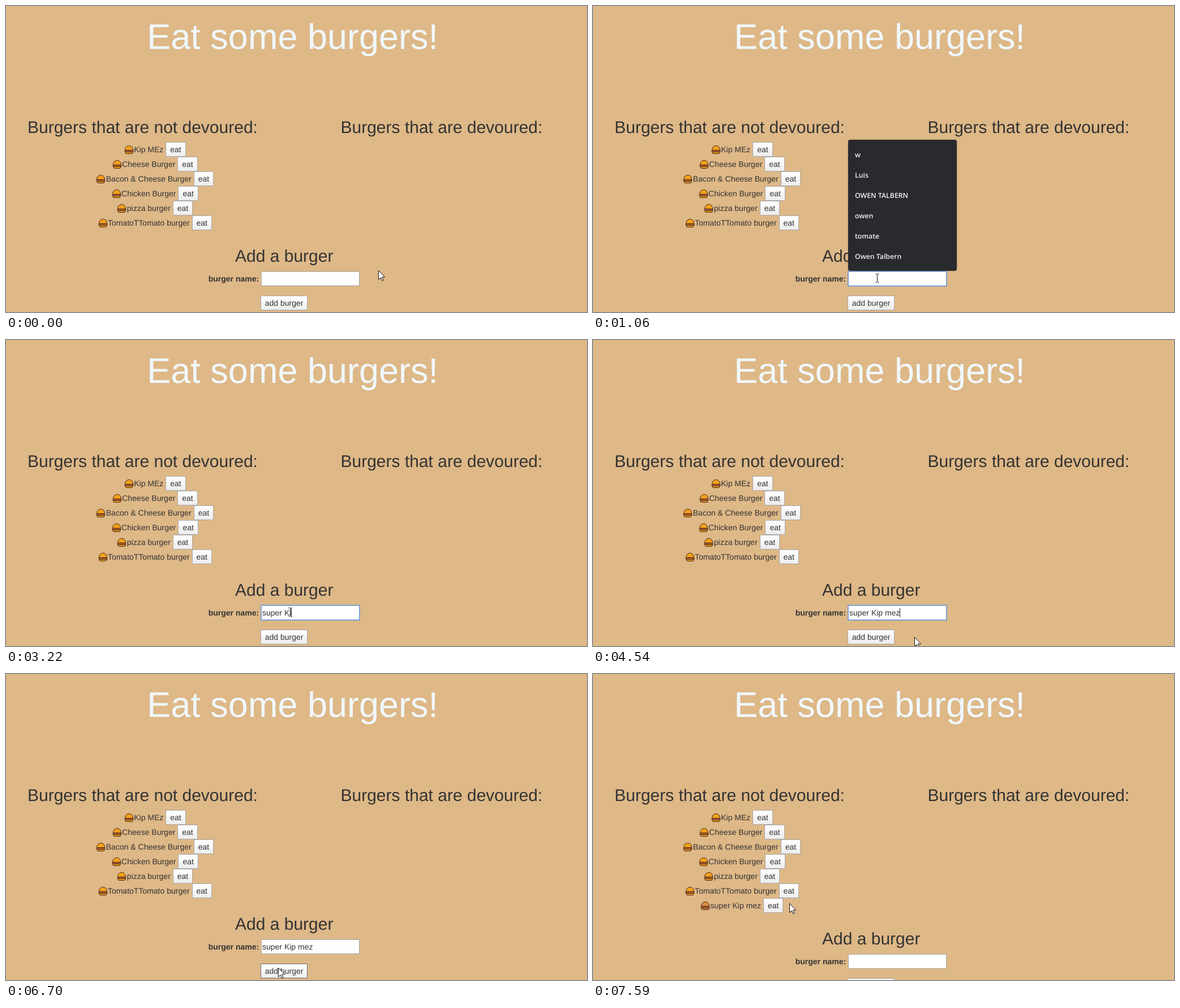
These frames come from a looping animation (1027x542 px, 8000 ms). An HTML page:

```html
<!DOCTYPE html>
<html lang="en">
<head>
<meta charset="utf-8">
<title>Eat some burgers!</title>
<style>
  html, body { margin: 0; width: 100%; height: 100%; overflow: hidden; background: #deb887; }
  body {
    position: relative; color: #333; white-space: pre; text-rendering: geometricPrecision;
    font: 14px/26px Arial, "Liberation Sans", sans-serif;
  }
  body * { box-sizing: border-box; }
  h1, h2, .abs, .row { position: absolute; margin: 0; font-weight: 400; }
  h1 { left: 249.3px; top: 20px; font-size: 63px; line-height: 70px; color: #f0f8ff; }
  h2 { font-size: 30px; line-height: 34px; }
  .row { left: 0; width: 526.5px; height: 26px; display: flex; justify-content: center; }
  .row svg { width: 17.4px; height: 26px; flex: none; overflow: visible; }
  .row .btn { margin-left: 3.89px; }
  .btn {
    height: 26px; padding: 0 7px; line-height: 24px; border: 1px solid #a9a9a9;
    background: linear-gradient(#fff, #ededed);
  }
  .btn.focus { border-color: #6e6e6e; }
  #form { position: absolute; left: 0; top: 0; }
  #field {
    left: 451px; top: 470px; width: 174px; height: 26px; padding-left: 1px;
    line-height: 24px; border: 1px solid #a9a9a9; background: #fff;
  }
  #field.focus { border-color: #7fa2d6; box-shadow: 0 0 0 1px #7fa2d6; }
  #caret { display: inline-block; width: 1px; height: 16px; background: #222; vertical-align: -3px; }
  #menu {
    left: 451px; top: 237px; width: 192px; height: 232px; padding: 9px 12px; border-radius: 4px;
    background: #292a2d; color: #f1f3f4; box-shadow: 0 0 2px rgba(0, 0, 0, .5);
    font: 600 12.3px/36px "Open Sans", "Noto Sans", sans-serif;
  }
  #top { position: absolute; left: 0; top: 0; }
</style>
</head>
<body>
<h1>Eat some burgers!</h1>
<h2 style="left:38px;top:199px">Burgers that are not devoured:</h2>
<h2 style="left:591.5px;top:199px">Burgers that are devoured:</h2>
<div id="list"></div>
<div id="form">
  <h2 style="left:405px;top:427px">Add a burger</h2>
  <b class="abs" style="left:357.7px;top:470px;font-weight:700">burger name:</b>
  <div id="field" class="abs"><span id="typed"></span><i id="caret"></i></div>
  <div id="add" class="abs btn" style="left:449.7px;top:513px">add burger</div>
</div>
<div id="menu" class="abs"></div>
<svg id="top" width="1027" height="542">
  <circle id="click" cx="506" cy="523" r="12.5" fill="#f6e03c" opacity=".8"/>
  <g id="pointer" stroke-linejoin="round">
    <path id="arrow" d="M.5 .5V16.6L4.2 13.2L6.7 18.7L9 17.7L6.6 12.2H11.6Z" fill="#fff" stroke="#111"/>
    <path id="beam" d="M-3 -7.5H-1L0 -6.5L1 -7.5H3M0 -6.5V6.5M-3 7.5H-1L0 6.5L1 7.5H3" fill="none" stroke="#111"/>
    <path id="hand" d="M-1.5 12V1.5a1.7 1.7 0 0 1 3.4 0V7.5q3-.8 3.4 1q3-.6 3.3 1q2.6-.2 2.7 2V15q0 3-2 5v2h-9v-2l-5.5-7q-1.5-2.5 .8-3q1.5 0 2.9 2zM1.9 7.5V12M5.3 8.5V12M8.6 9.5V12" fill="#fff" stroke="#111"/>
  </g>
</svg>
<script>
const $ = id => document.getElementById(id);
const show = (id, on) => { $(id).style.display = on ? "" : "none"; };

const NEW_BURGER = "super Kip mez";
const burgers = ["Kip MEz", "Cheese Burger", "Bacon &amp; Cheese Burger", "Chicken Burger",
  "pizza burger", "TomatoTTomato burger", NEW_BURGER];
const icon = bun => `<svg viewBox="0 0 17.4 26"><g stroke="#3b2010" fill="${bun}">
  <path d="M1.6 14.5C1.2 3.8 15.8 3.8 15.4 14.5Z"/><path d="M2 17.5H15V18.5Q15 20.5 13 20.5H4Q2 20.5 2 18.5Z"/>
  <rect x="1" y="14.5" width="15" height="3" rx="1" fill="#b5643a"/></g></svg>`;

$("list").innerHTML = burgers.map((name, i) => `<div class="row" id="row${i}" style="top:${241 + 26 * i}px">` +
  icon(i < 6 ? "#f5a01c" : "#dc8f43") + `<span>${name}</span><div class="btn">eat</div></div>`).join("");
$("menu").innerHTML = ["w", "Luis", "OWEN TALBERN", "owen", "tomate", "Owen Talbern"]
  .map(s => `<div>${s}</div>`).join("");

// Each step overrides what came before it.
const LOOP = 8000;
const steps = [
  { at: 0, kind: "arrow", x: 658, y: 468, chars: 0 },
  { at: 100, kind: "beam", x: 467.5, y: 441 },
  { at: 180, x: 502.5, y: 482 },
  { at: 1060, focus: true, menu: true },
  { at: 1920, menu: false, caret: true, chars: 3 },
  { at: 2370, chars: 4 },
  { at: 2800, chars: 7 },
  { at: 3220, chars: 8 },
  { at: 3660, chars: 12 },
  { at: 4110, chars: 13 },
  { at: 4540, kind: "arrow", x: 568, y: 526 },
  { at: 4960, x: 544, y: 528 },
  { at: 5400, kind: "hand", x: 506.5, y: 521, focus: false, caret: false, click: true },
  { at: 5850, click: false, pressed: true },
  { at: 6700, kind: "arrow", x: 481, y: 520 },
  { at: 7140, x: 376, y: 408, pressed: false, chars: 0, added: true },
  { at: 7590, x: 347, y: 406 }
];

function draw(t) {
  const s = Object.assign({}, ...steps.filter(step => step.at <= t));
  $("typed").textContent = NEW_BURGER.slice(0, s.chars);
  $("field").classList.toggle("focus", !!s.focus);
  $("add").classList.toggle("focus", !!s.pressed);
  show("caret", s.caret);
  show("menu", s.menu);
  show("click", s.click);
  show("row6", s.added);
  $("form").style.top = s.added ? "26px" : "0";
  for (const kind of ["arrow", "beam", "hand"]) show(kind, kind === s.kind);
  $("pointer").setAttribute("transform", `translate(${s.x} ${s.y})`);
}

const start = performance.now();
function tick() {
  draw((performance.now() - start) % LOOP);
  requestAnimationFrame(tick);
}
tick();
</script>
</body>
</html>
```
